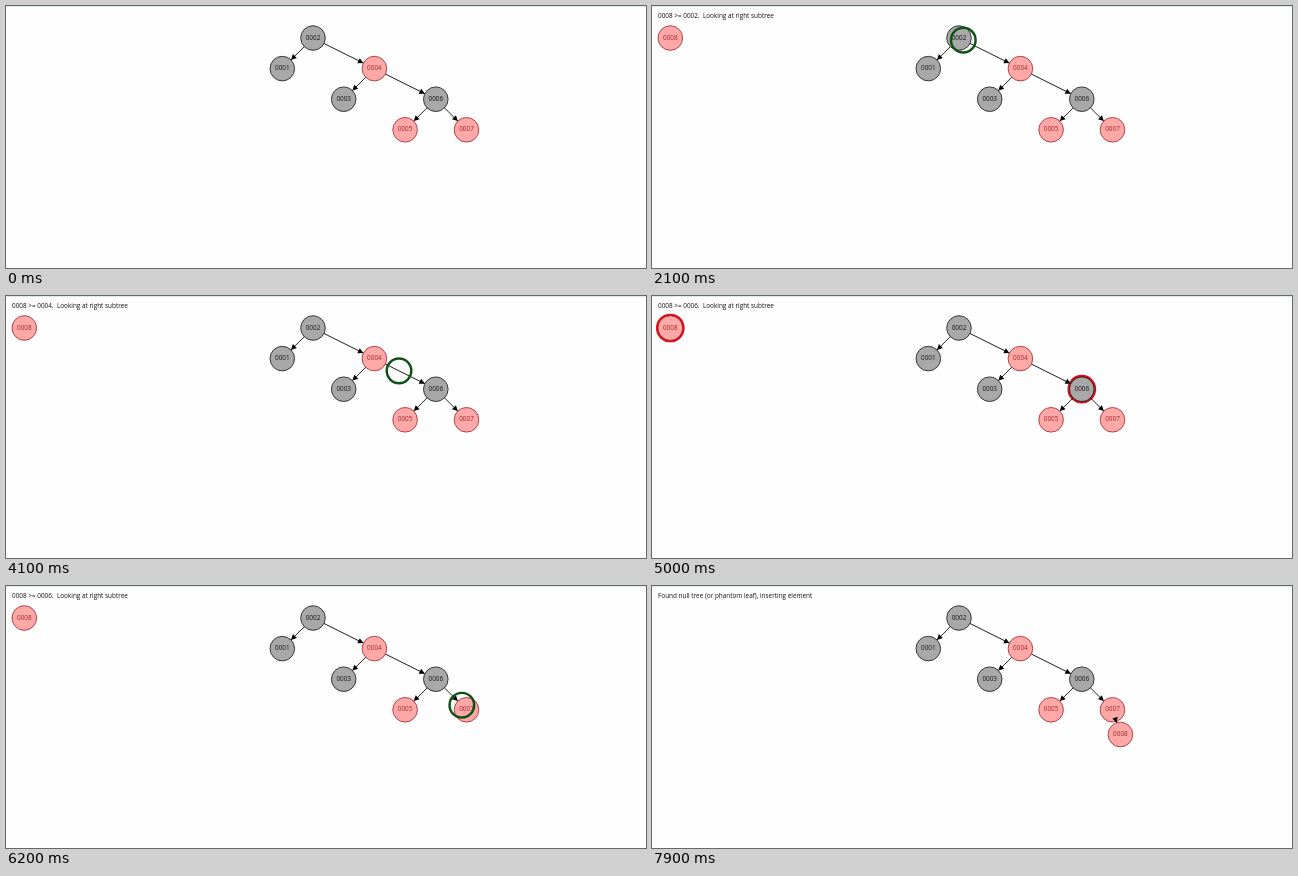
Recreate the animation shown at these times as an HTML page with a canvas. Size 640x262 px, loop 8000 ms.

```html
<!DOCTYPE html>
<html lang="en">
<head>
<meta charset="utf-8">
<title>Tree insertion</title>
<style>
  html, body { margin: 0; width: 100%; height: 100%; overflow: hidden; background: #fefefe; }
  canvas { display: block; width: 640px; height: 262px; }
</style>
</head>
<body>
<canvas id="stage"></canvas>
<script>
const W = 640, H = 262, LOOP = 8000, TICK = 100;
const R = 12.3, UNIT = 0.614;
const BLOCK = 858, FIRST = 1182, APPEAR = 100;
const INSERT = 7110, INSERT_TIME = 830;
const PULSE = 2 * BLOCK, PULSE_LOW = 4930;
const RED = { fill: '#ffa8a8', line: '#a02028', text: '#a02428' };
const GRAY = { fill: '#a8a8a8', line: '#151515', text: '#151515' };

const canvas = document.getElementById('stage');
const ctx = canvas.getContext('2d');
const dpr = window.devicePixelRatio || 1;
canvas.width = W * dpr;
canvas.height = H * dpr;

// Grid position: columns and rows around the root
const node = (key, col, row, skin) =>
  ({ label: '000' + key, x: 307 + col * 30.7, y: 32 + row * 30.6, skin });

const n2 = node(2, 0, 0, GRAY), n1 = node(1, -1, 1, GRAY);
const n4 = node(4, 2, 1, RED), n3 = node(3, 1, 2, GRAY);
const n6 = node(6, 4, 2, GRAY), n5 = node(5, 3, 3, RED);
const n7 = node(7, 5, 3, RED);
const tree = [n2, n1, n4, n3, n6, n5, n7];
const edges = [[n2, n1], [n2, n4], [n4, n3], [n4, n6], [n6, n5], [n6, n7]];
const path = [n2, n4, n6, n7];
const home = { x: 18.3, y: 32 };
const slot = { x: n7.x + 30.7, y: n7.y + 30.6 };

const mix = (a, b, p) => ({ x: a.x + (b.x - a.x) * p, y: a.y + (b.y - a.y) * p });

function text(str, x, y, color, align) {
  ctx.font = '6.4px "Open Sans", "Noto Sans", sans-serif';
  ctx.textAlign = align;
  ctx.textBaseline = 'middle';
  ctx.fillStyle = color;
  ctx.fillText(str, x, y);
}

function disc(x, y, r, fill) {
  ctx.beginPath();
  ctx.arc(x, y, r, 0, Math.PI * 2);
  ctx.fillStyle = fill;
  ctx.fill();
}

function drawNode(n, glow) {
  if (glow) disc(n.x, n.y, R + glow, '#d80c14');
  disc(n.x, n.y, R, n.skin.fill);
  ctx.strokeStyle = n.skin.line;
  ctx.lineWidth = 0.8;
  ctx.stroke();
  text(n.label, n.x, n.y, n.skin.text, 'center');
}

function drawEdge([a, b]) {
  const len = Math.hypot(b.x - a.x, b.y - a.y);
  ctx.save();
  ctx.translate(a.x, a.y);
  ctx.rotate(Math.atan2(b.y - a.y, b.x - a.x));
  const tip = len - R;
  ctx.strokeStyle = ctx.fillStyle = '#000';
  ctx.lineWidth = 0.8;
  ctx.beginPath();
  ctx.moveTo(R, 0);
  ctx.lineTo(tip, 0);
  ctx.stroke();
  ctx.beginPath();
  ctx.moveTo(tip, 0);
  ctx.lineTo(tip - 5.4, -2.8);
  ctx.lineTo(tip - 5.4, 2.8);
  ctx.fill();
  ctx.restore();
}

function pulse(t) {
  const turn = (((t - PULSE_LOW) / PULSE) % 1 + 1) % 1;
  return (3 + 8 * Math.min(turn, 1 - turn)) * UNIT;
}

// What the algorithm is doing at time t
function stateAt(t) {
  const s = { message: '', lit: null, cursor: null, fresh: null, linked: false };
  if (t < APPEAR) return s;
  s.fresh = { label: '0008', skin: RED, ...home };
  if (t < FIRST) {
    s.message = 'Inserting 0008';
  } else if (t < INSERT) {
    const block = Math.floor((t - FIRST) / BLOCK);
    const i = block >> 1;
    s.message = `0008 >= ${path[i].label}.  Looking at right subtree`;
    if (block % 2) s.cursor = mix(path[i], path[i + 1], (t - FIRST) / BLOCK - block);
    else s.lit = path[i];
  } else {
    s.message = 'Found null tree (or phantom leaf), inserting element';
    Object.assign(s.fresh, mix(home, slot, Math.min(1, (t - INSERT) / INSERT_TIME)));
    s.linked = true;
  }
  return s;
}

function draw(t) {
  const s = stateAt(t);
  const glow = pulse(t);
  ctx.setTransform(dpr, 0, 0, dpr, 0, 0);
  ctx.fillStyle = '#fefefe';
  ctx.fillRect(0, 0, W, H);
  ctx.fillStyle = '#d9eee2';
  ctx.fillRect(0, 0, W, 1);

  tree.forEach(n => drawNode(n, n === s.lit && glow));
  if (s.fresh) drawNode(s.fresh, s.lit && glow);
  edges.forEach(drawEdge);
  if (s.linked) drawEdge([n7, s.fresh]);
  if (s.cursor) {
    ctx.beginPath();
    ctx.arc(s.cursor.x, s.cursor.y, R, 0, Math.PI * 2);
    ctx.strokeStyle = '#0d5214';
    ctx.lineWidth = 4 * UNIT;
    ctx.stroke();
  }
  text(s.message, 6, 10, '#111', 'left');
}

const start = performance.now();
function frame() {
  const t = (performance.now() - start) % LOOP;
  draw(Math.floor(t / TICK) * TICK);
  requestAnimationFrame(frame);
}
frame();
</script>
</body>
</html>
```
